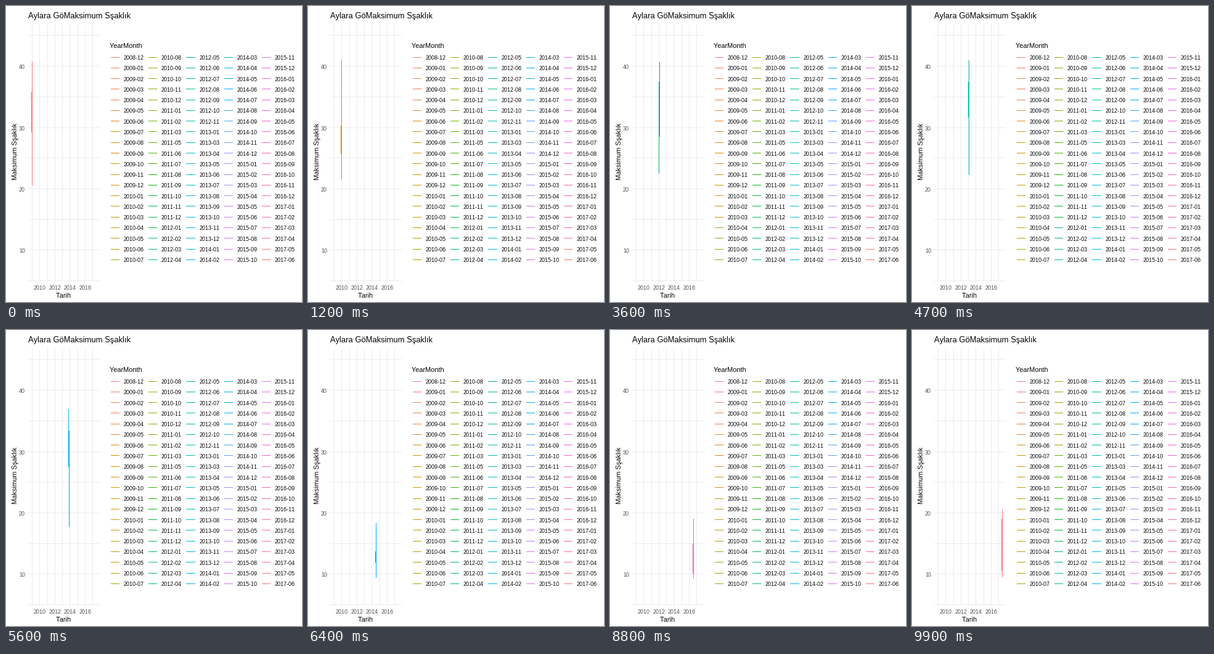
Animation of 480 by 480 pixels, one loop 10000 ms. Source, as a matplotlib script:

```python
import numpy as np
import matplotlib.pyplot as plt
from matplotlib.animation import FuncAnimation
from matplotlib.collections import LineCollection

SIZE = 480
GREY = "#4D4D4D"
plt.rcParams.update({
    "font.family": "Liberation Sans",
    "text.hinting": "native",
    "text.hinting_factor": 8,
    "text.kerning_factor": 6,
})

START = np.datetime64("2008-12")
LAST_DAY = np.datetime64("2017-06-25")
GAPS = {"2011-04", "2012-12", "2013-02"}
MONTHS = [m for m in START + np.arange(103) if str(m) not in GAPS]


def day_x(date):
    days = (date - START.astype("M8[D]")).astype(int)
    return np.floor(41.752 + 0.033453 * days).astype(int)


def temp_y(t):
    return np.floor(97.6 + (40 - t) * 9.94)


def hue_color(i, n):
    """Evenly spaced hue at chroma 100 and luminance 65."""
    h = np.radians(15 + 360 * i / n)
    lum = 65
    y = ((lum + 16) / 116) ** 3
    u = 100 * np.cos(h) / (13 * lum) + 0.1978
    v = 100 * np.sin(h) / (13 * lum) + 0.4683
    x = y * 9 * u / (4 * v)
    z = -x / 3 - 5 * y + 3 * y / v
    rgb = np.array([[3.2405, -1.5371, -0.4985],
                    [-0.9693, 1.8760, 0.0416],
                    [0.0556, -0.2040, 1.0572]]) @ [x, y, z]
    rgb = np.clip(rgb, 0, 1)
    return tuple(np.where(rgb > 0.00304,
                          1.055 * rgb ** (1 / 2.4) - 0.055, 12.92 * rgb))


def daily_highs(month, n, rng):
    """Random daily maxima between the seasonal low and high."""
    season = np.cos(2 * np.pi * (month.astype(int) % 12) / 12)
    lo = 15.3 + 6.5 * season + rng.uniform(-0.8, 0.8)
    hi = 30 + 11.7 * season + rng.uniform(-1.2, 1.2)
    t = np.convolve(rng.normal(size=n + 2), [0.5, 0.8, 0.5], "valid")
    return lo + (hi - lo) * (t - t.min()) / np.ptp(t)


def strokes(i):
    """One vertical segment per pixel column the month's path crosses."""
    month = MONTHS[i]
    days = np.arange(month.astype("M8[D]"), (month + 1).astype("M8[D]"))
    days = days[days <= LAST_DAY]
    temps = daily_highs(month, len(days), np.random.default_rng(70 + i))
    xs = day_x(days)
    return [vline(x, temp_y(temps[xs == x].max()),
                  temp_y(temps[xs == x].min()) + 1) for x in np.unique(xs)]


# A quarter pixel keeps one-pixel lines inside the intended pixel
def vline(x, y0, y1):
    return [(x + 0.25, y0), (x + 0.25, y1)]


def hline(y, x0, x1):
    return [(x0, y + 0.25), (x1, y + 0.25)]


fig = plt.figure(figsize=(SIZE / 72, SIZE / 72), dpi=72, facecolor="white")
ax = fig.add_axes([0, 0, 1, 1])
ax.set(xlim=(0, SIZE), ylim=(SIZE, 0))
ax.axis("off")


def lines(segs, color, z):
    return ax.add_collection(LineCollection(
        segs, colors=color, linewidths=1, antialiaseds=False, zorder=z))


def label(x, y, s, size, color="black", **kw):
    ax.text(x, y, s, fontsize=size, color=color, va="baseline", **kw)


# Panel grid and axes
grid = [hline(temp_y(t), 36, 151) for t in range(5, 46, 5)]
for year in range(2009, 2018):
    x = day_x(np.datetime64(f"{year}-01-01"))
    grid.append(vline(x, 30, 446))
    if year % 2 == 0:
        label(x + 0.5, 460, str(year), 9, GREY, ha="center")
lines(grid, "#EBEBEB", 1)
for t in (10, 20, 30, 40):
    label(31, temp_y(t) + 5, str(t), 9, GREY, ha="right")

label(36, 20, "Aylara GöMaksimum Sşaklık", 13)
label(93.5, 473, "Tarih", 11, ha="center")
label(18, 236, "Maksimum Sşaklık", 11, ha="center",
      rotation=90, rotation_mode="anchor")

# Legend: five columns of twenty months
label(168, 68, "YearMonth", 11)
colors = [hue_color(i, len(MONTHS)) for i in range(len(MONTHS))]
keys = []
for i, month in enumerate(MONTHS):
    col, row = divmod(i, 20)
    x, y = 168 + 61.25 * col, 17.28 * row
    keys.append(hline(np.floor(83 + y), round(x + 2), round(x + 15)))
    label(round(x + 23), round(87 + y), str(month), 9)
lines(keys, colors, 2)

paths = [strokes(i) for i in range(len(MONTHS))]
trace = lines(paths[0], [colors[0]], 3)


def update(i):
    trace.set_segments(paths[i])
    trace.set_color([colors[i]])
    return (trace,)


anim = FuncAnimation(fig, update, frames=len(MONTHS), interval=100,
                     init_func=lambda: update(0), repeat=True,
                     repeat_delay=0, blit=False)
plt.show()
```
